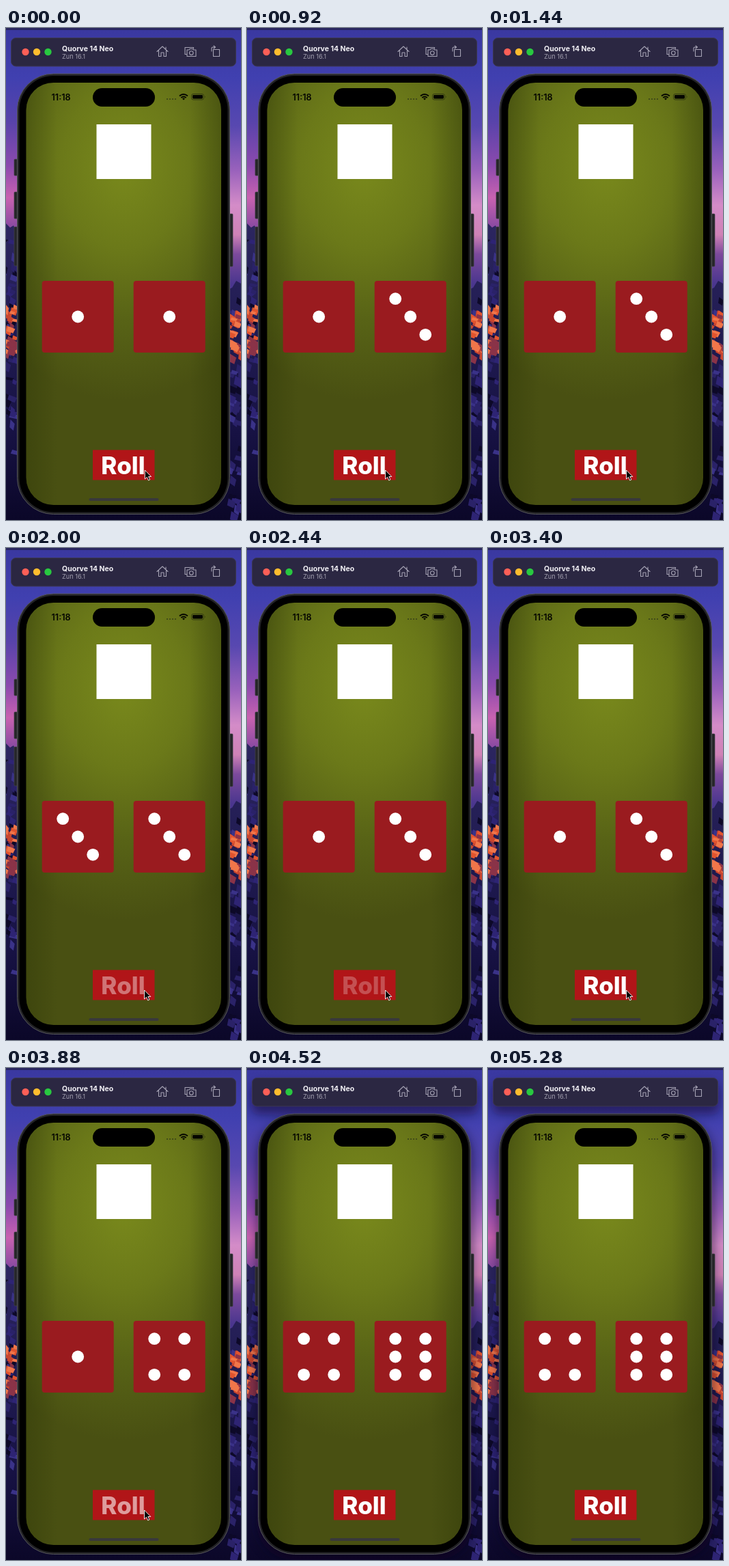
Write an HTML page that moves like this. It is 344x720 px and loops after 5.4 s.

```html
<!DOCTYPE html>
<html lang="en">
<head>
<meta charset="utf-8">
<title>Dice roller</title>
<style>
html, body { margin: 0; width: 100%; height: 100%; overflow: hidden; background: #0b0824; }
svg { display: block; width: 344px; height: 720px; font-family: Inter, Roboto, sans-serif; }
</style>
</head>
<body>
<svg viewBox="0 0 344 720">
  <defs>
    <linearGradient id="west" gradientUnits="userSpaceOnUse" x1="0" y1="0" x2="0" y2="720">
      <stop offset="0" stop-color="#3a38a0"/>
      <stop offset=".1" stop-color="#4040b0"/>
      <stop offset=".19" stop-color="#5843aa"/>
      <stop offset=".28" stop-color="#8c4aae"/>
      <stop offset=".345" stop-color="#c862b0"/>
      <stop offset=".4" stop-color="#8e4ca2"/>
    </linearGradient>
    <linearGradient id="east" gradientUnits="userSpaceOnUse" x1="0" y1="0" x2="0" y2="720">
      <stop offset="0" stop-color="#3a38a0"/>
      <stop offset=".1" stop-color="#4040b0"/>
      <stop offset=".2" stop-color="#5848b0"/>
      <stop offset=".29" stop-color="#9a62bc"/>
      <stop offset=".36" stop-color="#d48cc8"/>
      <stop offset=".42" stop-color="#cf82b6"/>
      <stop offset=".46" stop-color="#7c4a9c"/>
      <stop offset=".52" stop-color="#4a368e"/>
    </linearGradient>
    <linearGradient id="rock" x2="0" y2="1">
      <stop offset="0" stop-color="#2c2660"/>
      <stop offset=".45" stop-color="#1e194e"/>
      <stop offset=".7" stop-color="#171244"/>
      <stop offset="1" stop-color="#0b0728"/>
    </linearGradient>
    <radialGradient id="felt" gradientUnits="userSpaceOnUse" cx="172" cy="205" r="262"
      gradientTransform="translate(0 -62) scale(1 1.3)">
      <stop offset="0" stop-color="#79891c"/>
      <stop offset=".35" stop-color="#6b7919"/>
      <stop offset=".65" stop-color="#586316"/>
      <stop offset="1" stop-color="#495012"/>
    </radialGradient>
    <linearGradient id="side">
      <stop offset="0" stop-color="#1c2600" stop-opacity=".24"/>
      <stop offset=".16" stop-color="#1c2600" stop-opacity="0"/>
      <stop offset=".84" stop-color="#1c2600" stop-opacity="0"/>
      <stop offset="1" stop-color="#1c2600" stop-opacity=".24"/>
    </linearGradient>
    <filter id="blur" x="-20%" y="-20%" width="140%" height="140%"><feGaussianBlur stdDeviation="8"/></filter>
  </defs>

  <!-- wallpaper -->
  <rect width="172" height="720" fill="url(#west)"/>
  <rect x="172" width="172" height="720" fill="url(#east)"/>
  <rect width="344" height="3" fill="#29265f"/>
  <path d="M0 286 6 292 11 289 18 304 170 420 322 384 331 380 337 370 344 374V720H0Z" fill="url(#rock)"/>
  <g id="rocks"></g>

  <!-- window bar -->
  <g id="shade" fill="#08061c" filter="url(#blur)">
    <rect x="6" y="22" width="333" height="46" rx="10"/>
    <rect x="14" y="76" width="317" height="644" rx="54"/>
  </g>
  <rect x="7.500" y="14.500" width="329" height="41.500" rx="7" fill="#2b2742" stroke="#3b3755"/>
  <circle cx="28.500" cy="35" r="5.200" fill="#fe5f57"/>
  <circle cx="45" cy="35" r="5.200" fill="#febc2e"/>
  <circle cx="61.500" cy="35" r="5.200" fill="#28c840"/>
  <text x="82" y="33.500" font-size="10.500" font-weight="700" fill="#f1f0f5">Quorve 14 Neo</text>
  <text x="82" y="45" font-size="9.200" fill="#a19eae">Zun 16.1</text>
  <g fill="none" stroke="#a5a2b4" stroke-width="1.100" stroke-linejoin="round" stroke-linecap="round">
    <path d="M221 34.500 229 27 237 34.500M223.500 33V41.500H227V36H231V41.500H234.500V33M234 31V28"/>
    <path d="M264.500 38.500H262V28.500H274.500V30M265 32H268L269 30.500H273.500L274.500 32H278V41.500H265Z"/>
    <circle cx="271.300" cy="36.600" r="2.800"/>
    <path d="M303.500 31.500H312.500V41.500H303.500ZM301 34V29.500Q301 28 303 28H306M304 26 306.500 28 304 30"/>
  </g>

  <!-- phone -->
  <g fill="#262629" stroke="#44444a" stroke-width=".7">
    <rect x="12" y="192" width="6" height="24" rx="1"/>
    <rect x="12" y="240" width="6" height="39" rx="1"/>
    <rect x="12" y="291" width="6" height="57" rx="1"/>
    <rect x="326" y="272" width="6" height="77" rx="1"/>
  </g>
  <rect x="16.500" y="67" width="311" height="644.500" rx="53" fill="#232326" stroke="#55555a"/>
  <rect x="19.500" y="70" width="305" height="638.500" rx="50" fill="#000"/>
  <rect x="29.500" y="80" width="285.500" height="618" rx="40" fill="url(#felt)"/>
  <rect x="29.500" y="80" width="285.500" height="618" rx="40" fill="url(#side)"/>
  <rect x="127" y="88" width="91" height="27" rx="13.500" fill="#000"/>
  <text x="66.500" y="105.500" font-size="12.600" font-weight="600" fill="#050600">11:18</text>
  <g fill="#39421a">
    <circle cx="236" cy="104" r="1.100"/><circle cx="240" cy="104" r="1.100"/>
    <circle cx="244" cy="104" r="1.100"/><circle cx="248" cy="104" r="1.100"/>
  </g>
  <path d="M254 99.500Q260 94.500 266 99.500M256.300 102Q260 99 263.700 102" fill="none" stroke="#050600" stroke-width="1.900"/>
  <path d="M258 103.300Q260 101.800 262 103.300L260 105.500Z" fill="#050600"/>
  <rect x="271.500" y="96.500" width="18" height="8.500" rx="2.600" fill="none" stroke="#353c12"/>
  <rect x="273" y="98" width="15" height="5.500" rx="1.400" fill="#050600"/>
  <path d="M291 99.200Q292.600 100.700 291 102.200Z" fill="#353c12"/>

  <rect x="132.500" y="141" width="80" height="80" fill="#fff"/>

  <g id="dice"></g>

  <rect x="127" y="617.500" width="90.500" height="44" fill="#b11518"/>
  <text id="roll" x="171.500" y="653" text-anchor="middle" font-size="35" font-weight="800" fill="#fff">Roll</text>
  <rect x="121.500" y="688" width="102" height="4" rx="2" fill="#39393a"/>
  <path id="cursor" d="M0 0V13L3 10.300 5.200 15 7.400 14 5.300 9.500H9.300Z" fill="#000" stroke="#fff" stroke-width=".9"/>
</svg>
<script>
const LOOP = 5400, PRESS = 120, FADE = 470;
const $ = id => document.getElementById(id);

// Each roll: release time of the button, then both faces.
const rolls = [[0, 1, 1], [440, 1, 3], [1880, 3, 3], [2410, 1, 3], [3660, 1, 4], [4040, 4, 6]];

const add = (parent, tag, attrs) => {
  const el = document.createElementNS('http://www.w3.org/2000/svg', tag);
  for (const key in attrs) el.setAttribute(key, attrs[key]);
  return parent.appendChild(el);
};

// Sunlit and shaded facets along both edges of the wallpaper.
let seed = 11;
const rand = () => (seed = seed * 16807 % 2147483647) / 2147483647;
const sunlit = ['#e2542e', '#c8452f', '#f0764a', '#8a3348'];
const shaded = ['#3a3288', '#2a2268', '#0d0928', '#2e2474'];
for (let i = 0; i < 130; i++) {
  const right = i % 2, lit = i >= 80;
  const x = (right ? 324 : -6) + rand() * 18;
  const y = lit ? 402 + rand() * 75 : (right ? 390 : 305) + rand() * 320;
  const w = 5 + rand() * 8, h = 5 + rand() * 13;
  add($('rocks'), 'path', {
    d: `M${x} ${y}l${w} ${h * .4} ${-w * .3} ${h * .6} ${-w * .9} ${-h * .3}Z`,
    fill: (lit ? sunlit : shaded)[Math.floor(rand() * 4)]
  });
}

// Pip order: top left, bottom right, top right, bottom left, middle left, middle right, centre.
const spots = [[-1, -1], [1, 1], [1, -1], [-1, 1], [-1, 0], [1, 0], [0, 0]];
const dice = [105.2, 239.2].map(cx => {
  const die = add($('dice'), 'g', { transform: `translate(${cx} 422.5)` });
  add(die, 'rect', { x: -52.5, y: -52.5, width: 105, height: 105, rx: 4, fill: '#9a1b1f' });
  return spots.map(([x, y]) => add(die, 'circle', { cx: x * 22, cy: y * 26.3, r: 8.9, fill: '#fff' }));
});

function show(pips, face) {
  const pairs = face - face % 2;
  pips.forEach((pip, i) => pip.style.display = (i < 6 ? i < pairs : face % 2) ? '' : 'none');
}

const clamp = v => Math.max(0, Math.min(1, v));

function draw(now) {
  const t = now % LOOP;
  const n = rolls.findLastIndex(r => r[0] <= t);
  const [released, ...faces] = rolls[n];
  dice.forEach((pips, i) => show(pips, faces[i]));

  const next = rolls[n + 1];
  const pressed = next && t > next[0] - PRESS;
  const alpha = pressed ? .2 : n ? .2 + .8 * clamp((t - released) / FADE) : 1;
  $('roll').setAttribute('opacity', alpha);

  const leave = clamp((t - 4200) / 260) ** 2;
  const x = (t < 400 ? 203.3 : 202.5) + 25 * leave;
  $('cursor').setAttribute('transform', `translate(${x} ${647 + 80 * leave})`);
  $('shade').setAttribute('opacity', t < 4460 ? 0 : .5);
  requestAnimationFrame(draw);
}
draw(0);
</script>
</body>
</html>
```
